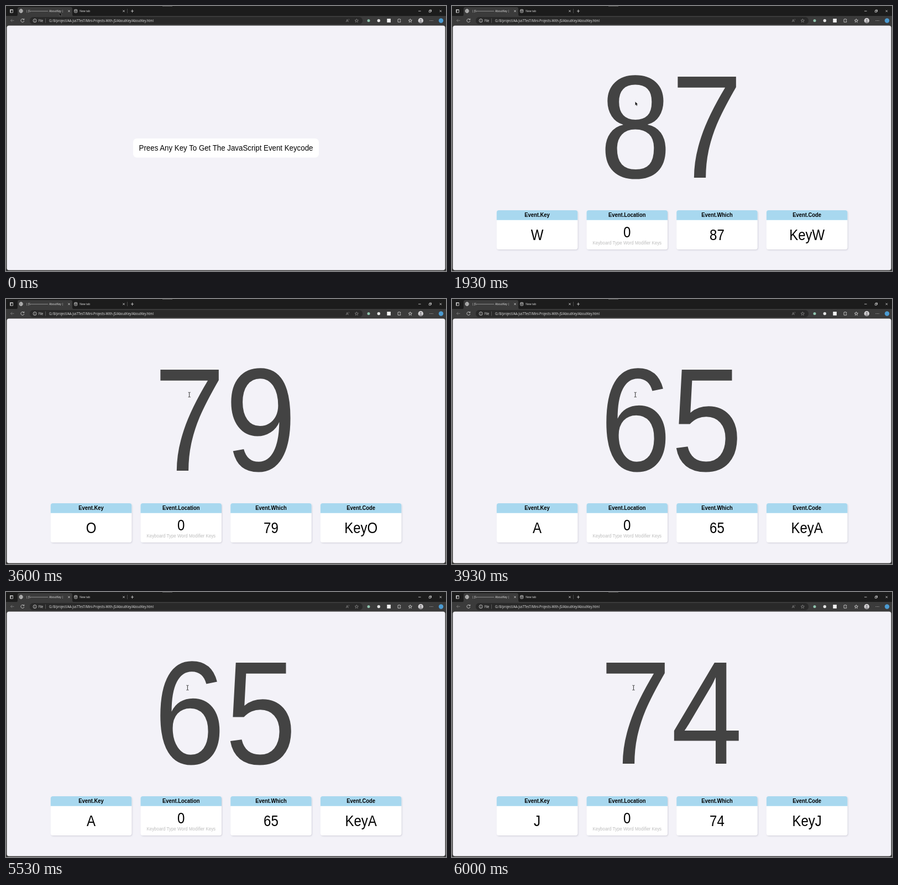
Recreate the animation shown at these times as an HTML page. Size 796 by 480 pixels, loop 6070 ms.

```html
<!DOCTYPE html>
<html lang="en">
<head>
<meta charset="utf-8">
<title>AboutKey</title>
<style>
  html, body { margin: 0; width: 100%; height: 100%; overflow: hidden; background: #3b3b3b; }
  svg { display: block; width: 796px; height: 480px; }
  text { font-family: "Liberation Sans", Arial, sans-serif; white-space: pre; }
  .ui { font-family: "Open Sans", "Noto Sans", sans-serif; fill: #e8e8e8; }
  .mid { text-anchor: middle; }
  .line { fill: none; stroke: #dcdcdc; stroke-width: .8; }
  .dim { stroke: #858585; }
</style>
</head>
<body>
<svg viewBox="0 0 796 480">
  <defs>
    <filter id="shadow" x="-10%" y="-10%" width="120%" height="125%">
      <feDropShadow dx="1" dy="1.2" stdDeviation="1.2" flood-color="#666680" flood-opacity=".25"/>
    </filter>
    <path id="star" d="M0-3.2 .9-1 3.2-.9 1.4.6 2 2.9 0 1.6-2 2.9-1.4.6-3.2-.9-.9-1z"/>
    <path id="close" d="M-1.7-1.7 1.7 1.7M1.7-1.7-1.7 1.7"/>
  </defs>

  <!-- browser window -->
  <rect width="796" height="480" fill="#3b3b3b"/>
  <rect width="796" height="18" fill="#1c1c1c"/>
  <rect x="283" width="18" height="1" fill="#555"/>
  <path d="M19 18q2 0 2-3V5q0-3 3-3h93q3 0 3 3v10q0 3 2 3z" fill="#3b3b3b"/>
  <rect x="43" y="20" width="602" height="13" rx="6" fill="#292929"/>
  <rect x="1.5" y="35.5" width="793" height="443" rx="4" fill="#f3f2f8"/>

  <g class="line">
    <path d="M7.5 6.5h5v5.5h-5zM7.5 7.2h5M8.7 6.5v5.5"/>
    <path d="M24 9h6.4M27.2 5.8v6.4"/><circle cx="27.2" cy="9" r="3.2"/><ellipse cx="27.2" cy="9" rx="1.5" ry="3.2"/>
    <path d="M44 9.3h32" opacity=".65"/>
    <use href="#close" x="114" y="9.2"/>
    <rect x="123.7" y="6.3" width="5" height="5.6" rx="1"/><path d="M123.7 8h5M125 9.8h2.4"/>
    <use href="#close" x="213" y="9.2"/>
    <path d="M219.5 5v8" opacity=".3"/>
    <path d="M226 9.2h5M228.5 6.5v5.4M746 9.2h4.5"/>
    <path d="M765.3 8.2h3v3h-3zM766.5 8V7h3v3h-1"/>
    <use href="#close" x="786.3" y="9.2"/>
    <path class="dim" d="M14.5 26.3h-6M11 23.8l-2.5 2.5 2.5 2.5"/>
    <path d="M32.3 24.5a3 3 0 1 0 .5 2.5M32.8 22.7v2.2h-2.2"/>
    <circle cx="52.2" cy="26.5" r="3.1"/><path d="M52.2 26v2.2M52.2 24.4v.7"/>
    <path d="M71.5 22.5v8" opacity=".35"/>
    <path class="dim" d="M615.3 29l2-5 2 5M616 27.2h2.6M620 23.5q1 1 0 2.2"/>
    <use href="#star" class="dim" x="634.3" y="26.5"/>
    <path d="M709 24h1.5q.7-2 1.5 0h1.7v1.5q-1.6.8 0 2v1.7H709z"/>
    <use href="#star" x="731.3" y="26.5"/>
    <path d="M766.5 26.5h1M769 26.5h1M771.5 26.5h1"/>
  </g>
  <circle cx="656" cy="26.5" r="2.5" fill="#8fc4ad"/>
  <circle cx="674.3" cy="26.5" r="2.7" fill="#e4e4e4"/>
  <rect x="689.3" y="23" width="6.6" height="6.8" fill="#f4f4f4"/>
  <circle cx="750.3" cy="26.5" r="4.7" fill="#d4d2d4"/>
  <circle cx="750.3" cy="25.2" r="1.6" fill="#8b898d"/>
  <path d="M747.2 29.5q3.1-4 6.2 0-3.1 2.6-6.2 0" fill="#8b898d"/>
  <circle cx="787" cy="26.5" r="4.2" fill="#4b9bd2"/>
  <g id="chromeText"></g>

  <!-- page -->
  <g id="prompt">
    <rect x="230" y="240" width="336" height="34.5" rx="6.5" fill="#fff"/>
  </g>
  <g id="result"></g>

  <!-- pointers -->
  <path id="arrow" d="M0 0v6.6l1.5-1.3 1.1 2.5 1.1-.5-1-2.4h2z" fill="#0a0a0a" stroke="#fff" stroke-opacity=".45" stroke-width=".4"/>
  <path id="beam" d="M-2-4.2h1.4l.6.5.6-.5H2M-2 4.2h1.4l.6-.5.6.5H2M0-3.7v7.4" fill="none" stroke="#333" stroke-width="1"/>
</svg>

<script>
const LOOP = 6070;
const STRETCH = 1.147;
const CARD = { width: 146.5, pitch: 162.7, left: 80.8, top: 370, bottom: 441, head: 17.7 };
const $ = id => document.getElementById(id);

const keys = [
  [1870, 'W'], [3400, 'S'], [3470, 'D'], [3530, 'P'], [3600, 'O'], [3730, 'P'],
  [3930, 'A'], [4070, 'M'], [5130, 'A'], [5270, 'D'], [5530, 'A'], [5600, 'W'],
  [5670, 'S'], [5730, 'D'], [5800, 'P'], [5930, 'O'], [6000, 'J']
];

function add(parent, tag, attributes) {
  const node = document.createElementNS('http://www.w3.org/2000/svg', tag);
  for (const name in attributes) node.setAttribute(name, attributes[name]);
  return parent.appendChild(node);
}

function label(parent, string, x, y, size, attributes = {}) {
  const node = add(parent, 'text', {
    transform: `translate(${x} ${y}) scale(1 ${STRETCH})`, 'font-size': size, ...attributes
  });
  node.textContent = string;
  return node;
}

const ui = { class: 'ui' }, mid = { class: 'mid' };
label($('chromeText'), '| JS', 36, 11.2, 4.9, ui);
label($('chromeText'), 'AboutKey |', 78, 11.2, 4.9, ui);
label($('chromeText'), 'New tab', 133.3, 11.2, 4.9, ui);
label($('chromeText'), 'File', 58.7, 28.5, 5.4, ui);
label($('chromeText'), 'G:/8/project/AA-JusTTesT/Mini-Projects-With-JS/AboutKey/AboutKey.html', 78, 28.5, 5.64, ui);
label($('prompt'), 'Prees Any Key To Get The JavaScript Event Keycode', 398, 262, 13.3, mid);

const big = label($('result'), '', 396.5, 311, 232, { ...mid, fill: '#434343' });
const values = ['Key', 'Location', 'Which', 'Code'].map((name, i) => {
  const { width, pitch, left, top, bottom, head } = CARD;
  const x = left + i * pitch, center = x + width / 2, right = x + width;
  const isLocation = name === 'Location';
  add($('result'), 'rect', { x, y: top, width, height: bottom - top, rx: 4, fill: '#fff', filter: 'url(#shadow)' });
  add($('result'), 'path', {
    d: `M${x} ${top + head}V${top + 4}q0-4 4-4H${right - 4}q4 0 4 4V${top + head}z`, fill: '#a8d8ef'
  });
  label($('result'), 'Event.' + name, center, 382, 9.4, { ...mid, 'font-weight': 700 });
  if (isLocation) label($('result'), 'Keyboard Type Word Modifier Keys', center, 432, 7.95, { ...mid, fill: '#bdbdbd' });
  return label($('result'), '', center, isLocation ? 419 : 423.5, 24, mid);
});

// Share of a stepped pointer move that is done at time t
const moved = (t, start, steps) =>
  Math.min(steps, Math.max(0, Math.floor((t - start) / 66) + 1)) / steps;
const smooth = p => p * p * (3 - 2 * p);
const place = (node, x, y) => node.setAttribute('transform', `translate(${x} ${y})`);
const show = (node, visible) => node.setAttribute('visibility', visible ? 'visible' : 'hidden');

let shownKey;
function draw() {
  const t = performance.now() % LOOP;
  const pressed = keys.filter(([time]) => time <= t).pop();
  const key = pressed ? pressed[1] : '';
  if (key !== shownKey) {
    shownKey = key;
    show($('prompt'), !key);
    show($('result'), key);
    if (key) {
      const code = key.charCodeAt(0);
      big.textContent = code;
      [key, 0, code, 'Key' + key].forEach((value, i) => values[i].textContent = value);
    }
  }

  const first = smooth(moved(t, 270, 6)), second = smooth(moved(t, 870, 5));
  place($('arrow'), 96.5 + 219 * first + 16 * second, 11.5 + 156.5 * first + 5.3 * second);
  place($('beam'), 331.7 - 3.3 * moved(t, 4670, 2), 173.4);
  show($('arrow'), t < 3330);
  show($('beam'), t >= 3330);
  requestAnimationFrame(draw);
}
draw();
</script>
</body>
</html>
```
